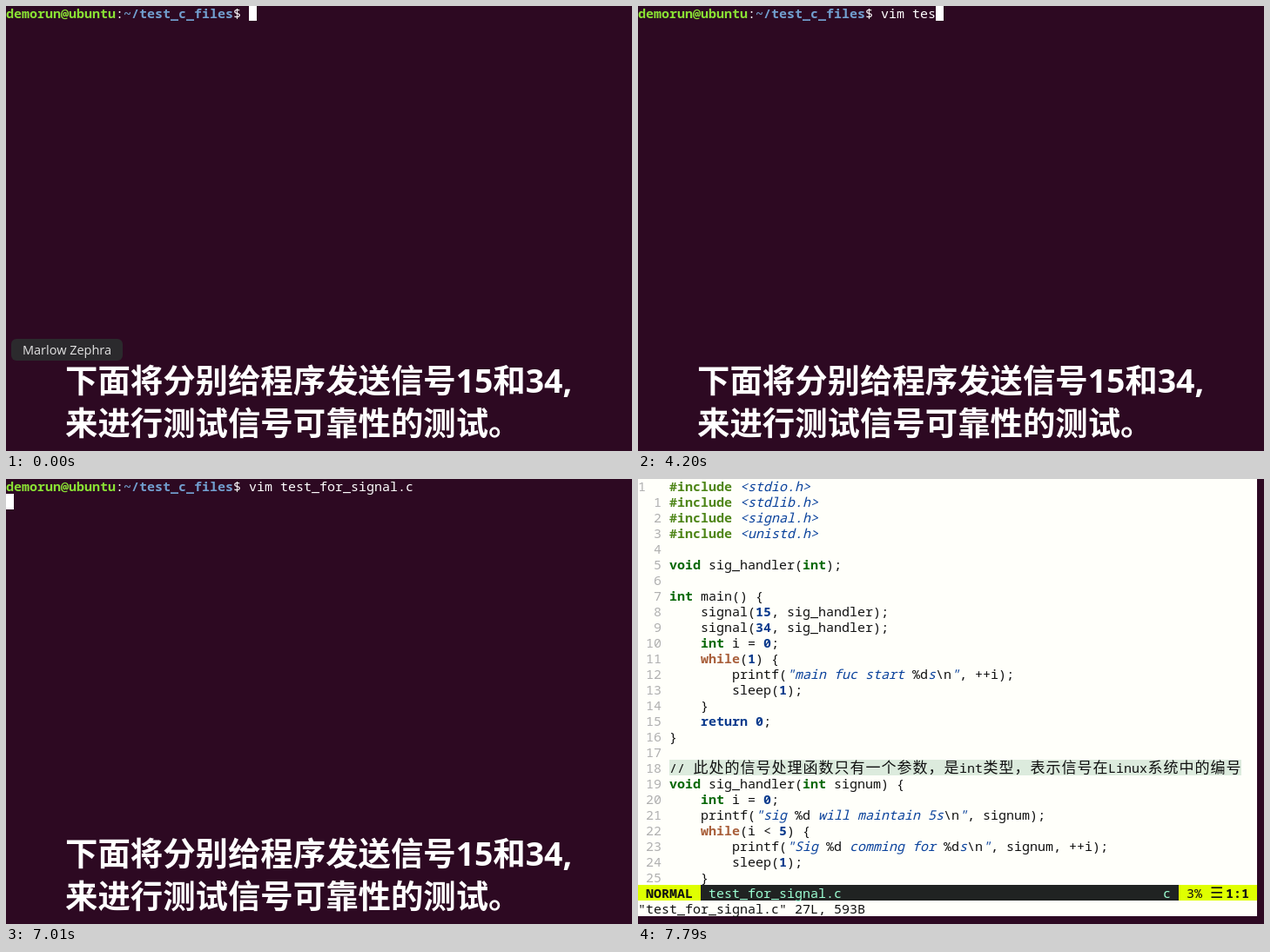
These frames come from a looping animation (719x512 px, 8 s). An HTML page:

```html
<!DOCTYPE html>
<html lang="zh-CN">
<head>
<meta charset="utf-8">
<title>Terminal session</title>
<style>
  html, body { margin: 0; width: 100%; height: 100%; overflow: hidden; background: #2d0922; }
  svg { display: block; width: 719px; height: 512px; }
  text { font: 15px "Noto Sans Mono", "DejaVu Sans Mono", monospace; white-space: pre; }
  .b { font-weight: 700; }
  .host { fill: #8ae234; font-weight: 700; }
  .path { fill: #729fcf; font-weight: 700; }
  .white { fill: #fff; }
  .ink { fill: #101010; }
  .num { fill: #b0b0b0; }
  .pre { fill: #4e8518; font-weight: 700; }
  .type { fill: #086808; font-weight: 700; }
  .loop { fill: #a9603c; font-weight: 700; }
  .val { fill: #0a3a8c; font-weight: 700; }
  .str { fill: #0a429c; font-style: italic; }
  .mint { fill: #9cffd3; }
  .dark { fill: #300a24; font-weight: 700; }
  .cjk { font: 17px "Noto Sans CJK SC", "Noto Sans CJK", sans-serif; letter-spacing: 1px; fill: #101010; }
  .menu { font: 17px "DejaVu Sans", sans-serif; }
  .sub { font: 700 37.4px "Open Sans", "Noto Sans CJK SC", "Noto Sans CJK", sans-serif; fill: #fff; }
  .tip { font: 14.5px "Open Sans", "Noto Sans", sans-serif; fill: #e2e2e2; text-anchor: middle; }
</style>
</head>
<body>
<svg viewBox="0 0 719 512">
  <rect width="719" height="512" fill="#2d0922"/>
  <g id="shell">
    <g id="prompt"></g>
    <rect id="caret" width="9" height="18" fill="#fff"/>
    <g id="tip">
      <rect x="6" y="383" width="128" height="25" rx="6" fill="#2b2a2d"/>
      <text class="tip" x="70" y="401">Marlow Zephra</text>
    </g>
    <text class="sub" x="68" y="445">下面将分别给程序发送信号15和34,</text>
    <text class="sub" x="68" y="494">来进行测试信号可靠性的测试。</text>
    <g id="pointer" fill="none">
      <path id="beam" d="M-2.5 -6.5H-1L0 -5.5L1 -6.5H2.5M0 -5.5V5.5M-2.5 6.5H-1L0 5.5L1 6.5H2.5" stroke="#e8e8e8" stroke-width="2.6"/>
      <use href="#beam"/>
      <path d="M-2.5 -6.5H-1L0 -5.5L1 -6.5H2.5M0 -5.5V5.5M-2.5 6.5H-1L0 5.5L1 6.5H2.5" stroke="#111"/>
    </g>
  </g>
  <g id="vim">
    <rect width="711" height="503" fill="#fffffa"/>
    <g id="buffer"></g>
    <g id="message"></g>
  </g>
</svg>
<script>
const LOOP = 8000, CW = 9, RH = 18;
const $ = id => document.getElementById(id);

function make(parent, tag, attrs, content = '') {
  const el = document.createElementNS('http://www.w3.org/2000/svg', tag);
  for (const key in attrs) el.setAttribute(key, attrs[key]);
  el.textContent = content;
  return parent.appendChild(el);
}
// Text and blocks on the terminal's character grid
const put = (parent, col, row, str, cls = 'ink') =>
  make(parent, 'text', { x: col * CW, y: row * RH + 14, class: cls }, str);
const block = (parent, col, row, cols, fill) =>
  make(parent, 'rect', { x: col * CW, y: row * RH - 1, width: cols * CW, height: RH, fill });

// Shell
const COMMAND = 'vim test_for_signal.c', START = 31;
put($('prompt'), 0, 0, 'demorun@ubuntu', 'host');
put($('prompt'), 14, 0, ':', 'white');
put($('prompt'), 15, 0, '~/test_c_files', 'path');
put($('prompt'), 29, 0, '$', 'white');
const typed = put($('prompt'), START, 0, '', 'white');

// Editor
const code = String.raw`#include <stdio.h>
#include <stdlib.h>
#include <signal.h>
#include <unistd.h>

void sig_handler(int);

int main() {
    signal(15, sig_handler);
    signal(34, sig_handler);
    int i = 0;
    while(1) {
        printf("main fuc start %ds\n", ++i);
        sleep(1);
    }
    return 0;
}

// 此处的信号处理函数只有一个参数，是int类型，表示信号在Linux系统中的编号
void sig_handler(int signum) {
    int i = 0;
    printf("sig %d will maintain 5s\n", signum);
    while(i < 5) {
        printf("Sig %d comming for %ds\n", signum, ++i);
        sleep(1);
    }`.split('\n');

const buffer = $('buffer');
const wordClass = w =>
  w === '#include' ? 'pre' : /^(void|int)$/.test(w) ? 'type' : w === 'while' ? 'loop' : 'val';

function tokens(line) {
  return line.split(/("[^"]*"|<\w+\.h>)/).flatMap((part, i) => i % 2
    ? part.split(/(%d|\\n)/).map((s, j) => [s, j % 2 ? 'ink' : 'str'])
    : part.split(/(#include|\bvoid\b|\bint\b|while|return|\d+)/).map((s, j) => [s, j % 2 ? wordClass(s) : 'ink']));
}

function drawComment(line, row) {
  block(buffer, 4, row, 73, '#dcebdd');
  let col = 4;
  for (const run of line.match(/[\x00-\x7f]+|[^\x00-\x7f]+/g)) {
    const wide = run.charCodeAt(0) > 127;
    const el = put(buffer, col, row, run, wide ? 'cjk' : 'ink');
    if (wide) el.setAttribute('dx', 0.5);
    col += run.length * (wide ? 2 : 1);
  }
}

code.forEach((line, row) => {
  put(buffer, 0, row, row ? String(row).padStart(3) : '1', 'num');
  if (line.startsWith('//')) return drawComment(line, row);
  let col = 4;
  for (const [str, cls] of tokens(line)) {
    if (str.trim()) {
      const lead = str.length - str.trimStart().length;
      put(buffer, col + lead, row, str.trimStart(), cls);
    }
    col += str.length;
  }
});

block(buffer, 0, 26, 79, '#202322');
block(buffer, 0, 26, 8, '#dfff00');
block(buffer, 69, 26, 10, '#dfff00');
put(buffer, 1, 26, 'NORMAL', 'ink b');
put(buffer, 9, 26, 'test_for_signal.c', 'mint');
put(buffer, 67, 26, 'c', 'mint');
put(buffer, 70, 26, '3%');
put(buffer, 73, 26, '☰', 'ink menu');
put(buffer, 75, 26, '1:1', 'ink b');
put($('message'), 0, 27, '"test_for_signal.c" 27L, 593B');

const editCaret = make(buffer, 'g', {});
block(editCaret, 4, 0, 1, '#fff');
put(editCaret, 4, 0, '#', 'dark');

// Timeline
const KEYS = [3320, 3390, 3460, 3610, 3870, 4000, 4200, 4330, 4660, 4930, 5020, 5120,
  5390, 5790, 5790, 5940, 6280, 6370, 6470, 6800, 6940];
const MOVES = [[70, 657, 499], [145, 430, 216], [220, 333, 52], [295, 296, 37], [370, 308, 38],
  [445, 328, 43], [520, 347, 49], [595, 360, 54], [670, 367, 56]];
const ENTER = 7010, OPEN = 7070, LOADED = 7200, BLINK = 7790;
const show = (el, on) => el.setAttribute('visibility', on ? 'inherit' : 'hidden');

function draw(t) {
  const count = KEYS.filter(k => k <= t).length;
  typed.textContent = COMMAND.slice(0, count);
  const entered = t >= ENTER;
  $('caret').setAttribute('x', entered ? 0 : (START + count) * CW);
  $('caret').setAttribute('y', entered ? RH - 1 : -1);

  $('tip').setAttribute('opacity', t < 70 ? 1 : t < 145 ? 0.5 : 0);
  const move = MOVES.filter(m => m[0] <= t).pop();
  show($('pointer'), move && t < 3270);
  if (move) $('pointer').setAttribute('transform', `translate(${move[1] + 0.5} ${move[2]})`);

  show($('shell'), t < OPEN);
  show($('vim'), t >= OPEN);
  show(buffer, t >= LOADED);
  show(editCaret, t < BLINK);
}

let origin;
function tick(now) {
  origin ??= now;
  draw((now - origin) % LOOP);
  requestAnimationFrame(tick);
}
draw(0);
requestAnimationFrame(tick);
</script>
</body>
</html>
```
